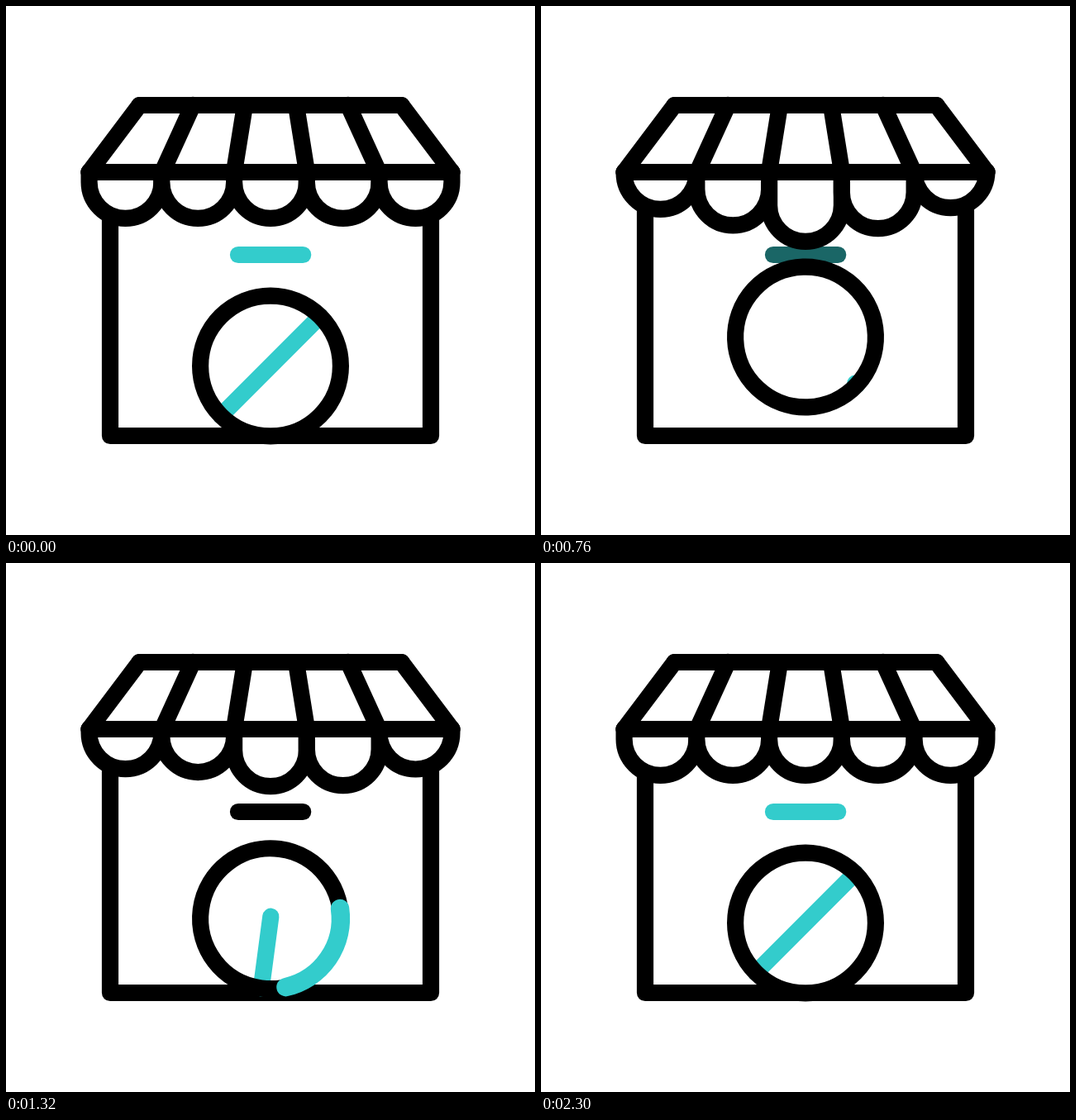
Write an HTML page with a canvas that moves like this. It is 640 by 640 pixels and loops after 2400 ms.

```html
<!DOCTYPE html>
<html lang="en">
<head>
<meta charset="utf-8">
<title>Shop with a swinging sign</title>
<style>
  html, body { margin: 0; width: 100%; height: 100%; overflow: hidden; background: #fff; }
  canvas { display: block; width: 100vmin; height: 100vmin; }
</style>
</head>
<body>
<canvas id="stage" width="640" height="640"></canvas>
<script>
const ctx = document.getElementById('stage').getContext('2d');
const LOOP = 2400, STEP = 20, LINE = 20.2, CENTER = 320;
const BLACK = '#000', TEAL = [51, 204, 204];
const teal = `rgb(${TEAL})`;

const clamp = u => Math.min(1, Math.max(0, u));
const progress = (start, end, t) => clamp((t - start) / (end - start));

// Smooth 0 to 1 between two times.
function ramp(start, end, t) {
  const u = progress(start, end, t);
  return u * u * (3 - 2 * u);
}

// Eases from one level to the next, one beat each, then stays on the last.
function swing(levels, beat, t) {
  const last = levels.length - 1;
  const pos = Math.min(last, Math.max(0, t / beat));
  const i = Math.min(last - 1, Math.floor(pos)), u = pos - i;
  return levels[i] + (levels[i + 1] - levels[i]) * u ** 3 * (6 * u * u - 15 * u + 10);
}

const scallopDrop = t => swing([0, -13, 28, -11, 15, -8, 0], 256, t);

function signY(t) {
  const hop = Math.sin(Math.PI * progress(1960, 2300, t)) ** 2;
  return 435.5 + swing([0, 54, -36, 54, -21, 14, 0], 360, t) - 49 * hop;
}

function signTurn(t) {
  const wobble = Math.sin(2 * Math.PI * progress(1605, 2180, t));
  return -92 * (ramp(0, 640, t) - ramp(780, 1740, t)) + 32 * wobble;
}

const slashLength = t => 1 - ramp(0, 820, t) + ramp(820, 1800, t);
const pillTint = t => 1 - ramp(680, 840, t) + ramp(1740, 1900, t);

function stroke(color = BLACK, width = LINE) {
  ctx.strokeStyle = color;
  ctx.lineWidth = width;
  ctx.stroke();
}

function line(points, color) {
  ctx.beginPath();
  points.forEach(([x, y]) => ctx.lineTo(x, y));
  stroke(color);
}

function fillWhite() {
  ctx.fillStyle = '#fff';
  ctx.fill();
}

function drawPill(t) {
  const tint = pillTint(t);
  line([[281, 301], [359.2, 301]], `rgb(${TEAL.map(c => Math.round(c * tint))})`);
}

function drawSign(t) {
  const radius = 84.9, rad = Math.PI / 180;
  const ring = (from, to) => {
    ctx.beginPath();
    ctx.arc(0, 0, radius, from * rad, to * rad);
  };
  ctx.save();
  ctx.translate(CENTER, signY(t));
  ctx.rotate(signTurn(t) * rad);

  ring(0, 360);
  fillWhite();

  const length = slashLength(t);
  if (length > 0.001) {
    const end = radius * Math.SQRT1_2, tip = end * (1 - 2 * length);
    line([[-end, end], [-tip, tip]], teal);
  }

  ring(0, 360);
  stroke();

  const from = ramp(1210, 2070, t), to = ramp(1120, 1690, t);
  if (to - from > 0.001) {
    ring(13 + 360 * from, 13 + 360 * to);
    stroke(teal, 22.5);
  }
  ctx.restore();
}

function drawScallop(i, t) {
  const r = 43.9, x = CENTER + 87.75 * (i - 2);
  const y = 213 + scallopDrop(t - i * 120);
  ctx.beginPath();
  ctx.moveTo(x - r, 201);
  ctx.arc(x, y, r, Math.PI, 0, true);
  ctx.lineTo(x + r, 201);
  ctx.closePath();
  fillWhite();
  stroke();
}

function drawRoof() {
  line([[100.5, 201], [539.5, 201]]);
  line([[161.5, 120], [478.5, 120]]);
  for (const side of [-1, 1]) {
    for (const [top, bottom] of [[31, 44], [94, 131], [158.5, 219.5]]) {
      line([[CENTER + side * top, 120], [CENTER + side * bottom, 201]]);
    }
  }
}

function draw(t) {
  ctx.fillStyle = '#fff';
  ctx.fillRect(0, 0, 640, 640);
  ctx.lineCap = ctx.lineJoin = 'round';
  line([[126, 225], [126, 520], [514, 520], [514, 225]]);
  drawPill(t);
  drawSign(t);
  for (let i = 0; i < 5; i++) drawScallop(i, t);
  drawRoof();
}

const began = performance.now();
function tick() {
  const t = (performance.now() - began) % LOOP;
  draw(Math.floor(t / STEP) * STEP);
  requestAnimationFrame(tick);
}
tick();
</script>
</body>
</html>
```
